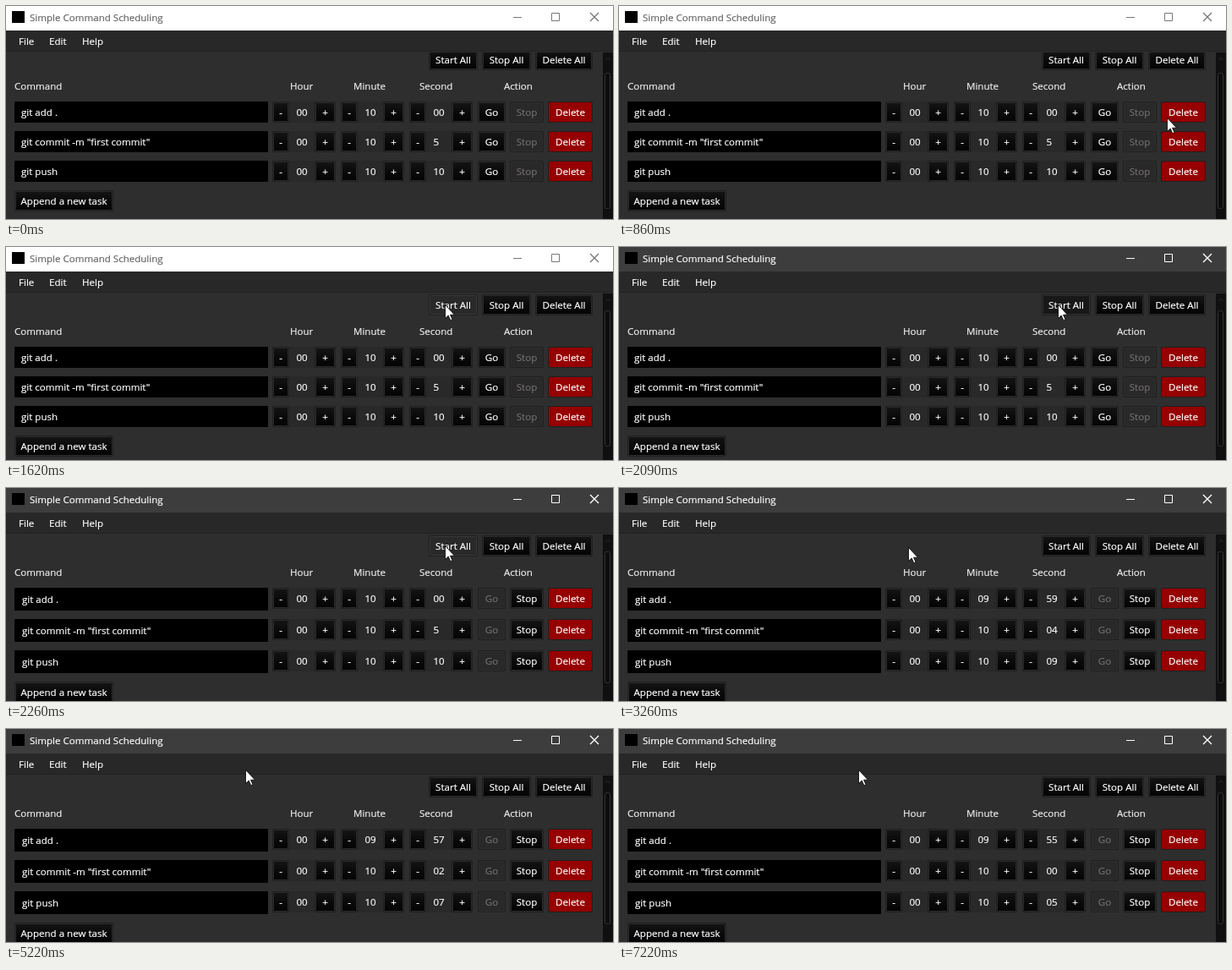
Animation, 718 px wide and 252 px high, one loop 8 s. Source, as an HTML page:

```html
<!DOCTYPE html>
<html lang="en">
<head>
<meta charset="utf-8">
<title>Simple Command Scheduling</title>
<style>
html, body { margin: 0; width: 100%; height: 100%; overflow: hidden; background: #2e2e2e; }
svg { display: block; width: 718px; height: 252px; }
text { font: 11.55px "Open Sans", "Noto Sans", sans-serif; white-space: pre; stroke-width: .2px; }
</style>
</head>
<body>
<svg viewBox="0 0 718 252">
  <defs>
    <linearGradient id="face" x2="0" y2="1">
      <stop stop-color="#141414"/><stop offset=".5" stop-color="#0a0a0a"/><stop offset="1" stop-color="#040404"/>
    </linearGradient>
    <clipPath id="body"><rect y="55" width="718" height="197"/></clipPath>
  </defs>
  <g id="stage"></g>
</svg>
<script>
const LOOP = 8000;
const SCROLL = 1310, FOCUS = 2090, START = 2260;
const TICKS = [3180, 4200, 5220, 6210, 7220];
// time, x, y of the pointer tip
const PATH = [
  [750, 694, 150], [830, 648, 132], [910, 602, 112], [990, 563, 92], [1080, 535, 74],
  [1170, 519, 62], [1240, 517, 62], [1310, 516, 62], [1540, 518, 65], [1620, 519, 68],
  [2940, 502, 70], [3020, 458, 73], [3100, 414, 74], [3180, 376, 73], [3260, 342, 70],
  [3340, 318, 65], [3420, 300, 58], [3500, 289, 52], [3580, 283, 48]
];
const TASKS = [
  ['git add .', 600, '00'],
  ['git commit -m "first commit"', 605, '5'],
  ['git push', 610, '10']
];
// fill, inner edge, label
const FACES = {
  normal: ['url(#face)', '#2a2a2a', '#fff'],
  hover: ['#292929', '#383838', '#fff'],
  pressed: ['#181818', '#303030', '#fff'],
  off: ['#292929', '#2e2e2e', '#716c70'],
  red: ['#960000', '#960000', '#fff']
};

const pad = n => String(n).padStart(2, '0');
const rect = (x, y, w, h, fill, more = '') =>
  `<rect x="${x}" y="${y}" width="${w}" height="${h}" fill="${fill}" ${more}/>`;
const text = (x, y, s, fill = '#fff', anchor = 'start') =>
  `<text x="${x}" y="${y}" fill="${fill}" stroke="${fill}" text-anchor="${anchor}">${s}</text>`;

function button(x, y, w, label, kind = 'normal') {
  const [fill, edge, ink] = FACES[kind];
  return rect(x, y, w, 25, '#202020', 'rx="2"') +
    rect(x + 1.5, y + 1.5, w - 3, 22, fill, `rx="1" stroke="${edge}"`) +
    text(x + w / 2, y + 17, label, ink, 'middle');
}

function spinner(x, y, value) {
  return rect(x, y, 75, 25, '#292929') + button(x, y, 20, '-') +
    text(x + 28.5, y + 17, value) + button(x + 50, y, 25, '+');
}

function titleBar(active) {
  const ink = active ? '#fff' : '#777';
  return rect(0, 0, 718, 29, active ? '#3d3d3d' : '#fff') +
    rect(7, 6, 15, 14, '#000') +
    text(28, 18, 'Simple Command Scheduling', active ? '#fff' : '#666') +
    `<path d="M600 13.5h10M645.5 8.5h9v9h-9z" fill="none" stroke="${ink}"/>` +
    `<path d="M691 8l10 10M701 8l-10 10" stroke="${ink}" stroke-width="1.4"/>`;
}

function menuBar() {
  return rect(0, 29, 718, 24, '#282828') + rect(0, 53, 718, 1, '#212121') +
    text(15, 46, 'File') + text(51, 46, 'Edit') + text(90, 46, 'Help');
}

function taskRow(task, y, running, ticks) {
  const [command, total, firstSecond] = task;
  const left = total - ticks;
  const inset = running ? 1 : 0;
  return rect(10, y, 300, 25 + 2 * inset, '#000', 'rx="1"') +
    text(18 + inset, y + 17 + inset, command) +
    spinner(315, y, '00') +
    spinner(396, y, pad(Math.floor(left / 60))) +
    spinner(477, y, ticks ? pad(left % 60) : firstSecond) +
    button(558, y, 33, 'Go', running ? 'off' : 'normal') +
    button(596, y, 40, 'Stop', running ? 'normal' : 'off') +
    button(641, y, 53, 'Delete', 'red');
}

function scrollBar(scrolled, running) {
  const top = scrolled ? 75 : 79;
  const end = running ? 230 : scrolled ? 235 : 239;
  return rect(706, 55, 12, 197, '#101010') +
    '<path d="M709.5 64l2.5-3l2.5 3" fill="none" stroke="#2a2a2a"/>' +
    rect(708.5, top + .5, 6, end - top, '#0d0d0d', 'rx="2" stroke="#333"');
}

function pointer(x, y) {
  return `<path transform="translate(${x} ${y})" d="M.5 .5V16.5L4.2 13L6.8 18.7L9 17.7L6.5 12.2H11.5Z" fill="#fff" stroke="#000" stroke-width=".8"/>`;
}

function scene(t) {
  const scrolled = t >= SCROLL, running = t >= START;
  const ticks = TICKS.filter(k => t >= k).length;
  const tip = PATH.filter(p => t >= p[0]).pop();
  const over = tip && tip[1] >= 500 && tip[1] < 558 && tip[2] < 81;
  const startKind = !over ? 'normal' : t >= FOCUS && !running ? 'pressed' : 'hover';
  const pitch = running ? 37 : 35;

  const content =
    button(500, 56, 58, 'Start All', startKind) +
    button(563, 56, 58, 'Stop All') +
    button(626, 56, 68, 'Delete All') +
    [[10, 'Command'], [336, 'Hour'], [411, 'Minute'], [489, 'Second'], [589, 'Action']]
      .map(([x, s]) => text(x, 104, s, '#eee')).join('') +
    TASKS.map((task, i) => taskRow(task, 118 + i * pitch, running, ticks)).join('') +
    button(10, 118 + 3 * pitch, 117, 'Append a new task');

  return rect(0, 0, 718, 252, '#2e2e2e') +
    `<g clip-path="url(#body)"><g transform="translate(0 ${scrolled ? 0 : -5})">${content}</g></g>` +
    scrollBar(scrolled, running) + titleBar(t >= FOCUS) + menuBar() +
    (tip ? pointer(tip[1], tip[2]) : '');
}

const stage = document.getElementById('stage');
let shown = '';
function frame() {
  const next = scene(performance.now() % LOOP);
  if (next !== shown) stage.innerHTML = shown = next;
  requestAnimationFrame(frame);
}
frame();
</script>
</body>
</html>
```
